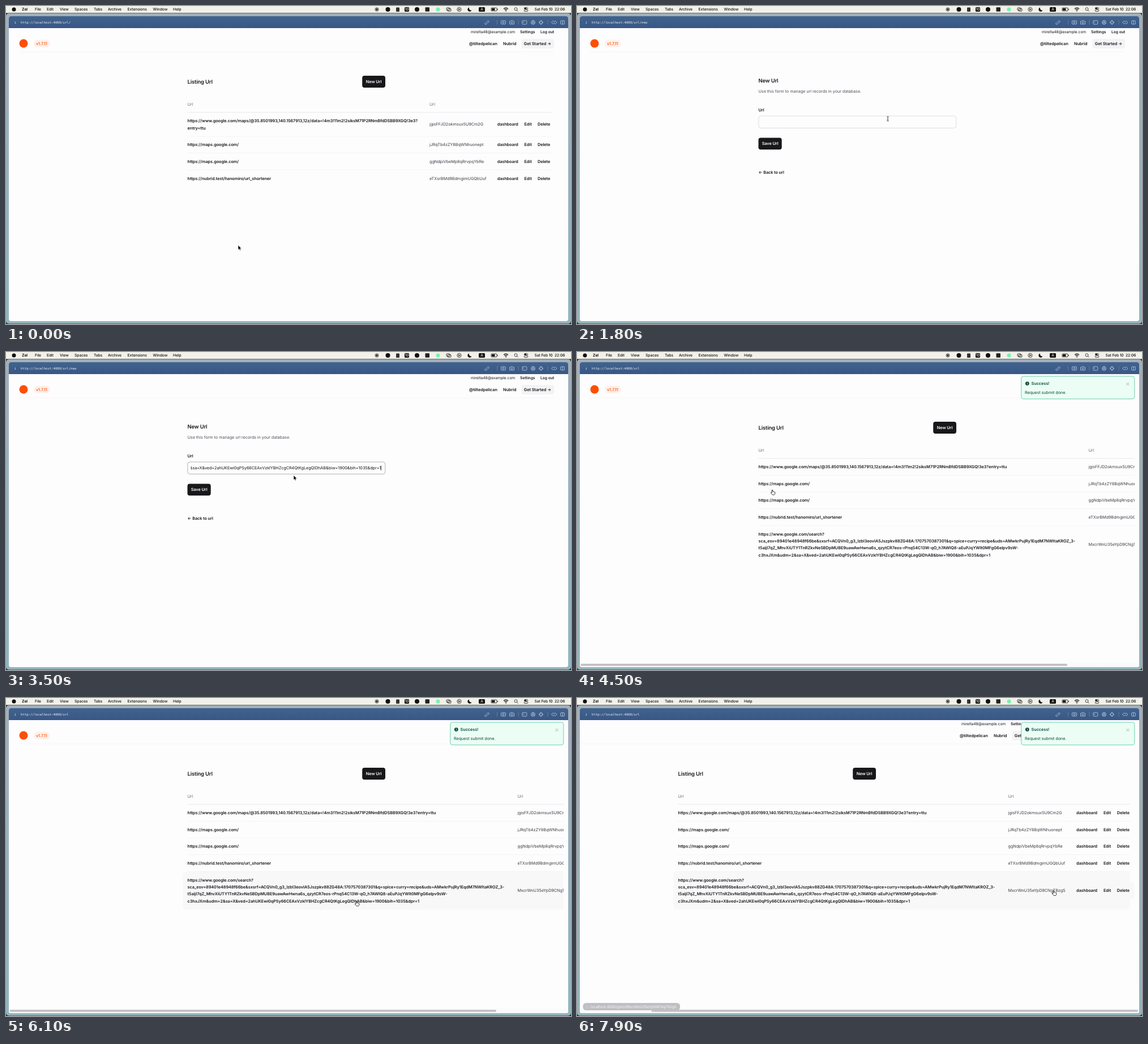
Animation, 998 px wide and 561 px high, one loop 8 s. Source, as an HTML page:

```html
<!DOCTYPE html>
<html lang="en">
<head>
<meta charset="utf-8">
<title>Url listing</title>
<style>
  html, body { margin: 0; width: 100%; height: 100%; overflow: hidden; background: #9db3bd; }
  svg { display: block; width: 100vw; height: 100vh; }
  text { font: 400 7.28px Inter, sans-serif; letter-spacing: -.008em; fill: #18181b; white-space: pre; text-rendering: geometricPrecision; }
  .b { font-weight: 600; }
  .title { font-size: 9.36px; font-weight: 600; letter-spacing: -.014em; }
  .small { font-size: 6.76px; }
  .menu { font-size: 6.76px; font-weight: 500; letter-spacing: -.015em; fill: #111; }
  .app { font-weight: 700; }
  .mono { font: 400 5.63px "DejaVu Sans Mono", monospace; letter-spacing: 0; fill: #eef2f8; }
  .mid { text-anchor: middle; }
  .end { text-anchor: end; }
  .white { fill: #fff; }
  .grey { fill: #71717a; }
  .sub { fill: #52525b; }
  .slug { fill: #3f3f46; }
  .brand { fill: #fd4f00; font-weight: 500; }
  .green { fill: #064e3b; }
  .status { font-size: 6.4px; fill: #f6f6f7; }
  .line { fill: none; stroke: #111; stroke-width: .8; }
  .tool { fill: none; stroke: #c3d0e2; stroke-width: .8; }
</style>
</head>
<body>
<svg viewBox="0 0 998 561" preserveAspectRatio="none">
  <defs>
    <linearGradient id="desk" x2="0" y2="1">
      <stop offset="0" stop-color="#a3afb9"/><stop offset="1" stop-color="#92b4bd"/>
    </linearGradient>
    <linearGradient id="bar" x2="0" y2="1">
      <stop offset="0" stop-color="#42638f"/><stop offset="1" stop-color="#385784"/>
    </linearGradient>
    <clipPath id="view"><rect x="5" y="39" width="980" height="509"/></clipPath>
    <clipPath id="field"><rect x="326.5" y="195" width="337" height="20"/></clipPath>
  </defs>
  <g id="chrome"></g>
  <g clip-path="url(#view)"><g id="content">
    <g id="header"></g><g id="before"></g><g id="form"></g><g id="after"></g>
  </g></g>
  <g id="extras"></g>
  <g id="status"></g>
  <g id="pointer">
    <path id="arrow" d="M0 0V8.2L1.9 6.5 3.1 9.3 4.6 8.6 3.4 5.9H6Z" fill="#000" stroke="#fff" stroke-width=".6"/>
    <path id="hand" d="M-.8 .6Q0-.6 .8 .6V3.4Q1.7 2.7 2.2 3.6 3.2 3 3.6 4 4.8 3.6 4.8 5V6.4Q4.7 8.4 3.4 9H.4Q-1 7.8-2.8 5.3-2.5 4-.8 5.3Z" fill="#fff" stroke="#000" stroke-width=".8"/>
    <path id="beam" d="M-1.8-4Q0-4 0-3 0-4 1.8-4M0-3V3M-1.8 4Q0 4 0 3 0 4 1.8 4M-.8 1H.8" fill="none" stroke="#222" stroke-width=".8"/>
  </g>
</svg>
<script>
const LOOP = 8000, STEP = 100;
const OPEN_FORM = 1300, FOCUS = 2300, PASTE = 2900, SAVED = 4500, STATUS = 7800;
const MAX_SCROLL = 142;

const $ = id => document.getElementById(id);
const esc = s => s.replace(/&/g, '&amp;');
const text = (x, y, s, cls = '') => `<text x="${x}" y="${y}" class="${cls}">${esc(s)}</text>`;
const rect = (x, y, w, h, fill, r = 0, more = '') =>
  `<rect x="${x}" y="${y}" width="${w}" height="${h}" rx="${r}" fill="${fill}" ${more}/>`;
const dot = (x, y, r, fill) => `<circle cx="${x}" cy="${y}" r="${r}" fill="${fill}"/>`;
const path = (d, cls = 'line', more = '') => `<path d="${d}" class="${cls}" ${more}/>`;
const ring = (x, y, r, cls = 'line') => `<circle cx="${x}" cy="${y}" r="${r}" class="${cls}"/>`;
const box = (x, y, w, h, cls = 'line') =>
  `<rect x="${x}" y="${y}" width="${w}" height="${h}" rx="1" class="${cls}"/>`;
const button = (x, y, w, label) =>
  rect(x, y, w, 20.8, '#18181b', 4) + text(x + w / 2, y + 13, label, 'b mid white');

// Window frame, menu bar and toolbar
const menus = [['File', 51], ['Edit', 72], ['View', 95], ['Spaces', 121], ['Tabs', 155],
  ['Archive', 180], ['Extensions', 214.5], ['Window', 259.5], ['Help', 295]];
$('chrome').innerHTML =
  rect(0, 0, 998, 561, '#25313c') +
  rect(0, 13, 998, 547.5, 'url(#desk)', 5) +
  rect(0, 0, 998, 12.3, '#f1f1e9') +
  dot(14, 6, 3.5, '#111') + text(28, 8.4, 'Zel', 'menu app') +
  menus.map(([s, x]) => text(x, 8.4, s, 'menu')).join('') +
  ring(655, 6, 3) + dot(655, 6, 1.7, '#111') +
  dot(674.5, 6, 4, '#111') +
  rect(689, 2.5, 6, 7.5, '#333', 1) +
  rect(704, 2, 8, 8, '#111', 1.5) + text(708, 8.1, '10', 'small mid white') +
  dot(726, 6, 4, '#111') +
  rect(740.5, 2.2, 7.5, 7.5, '#222', 1) +
  dot(763, 6, 3.5, '#7bf0ae') +
  box(778, 3, 6, 4.5) + box(780, 4.7, 6, 4.5) +
  ring(800.5, 6, 3.6) + path('M799.5 4.3V7.7L802.3 6Z') +
  path('M818 2.4A3.8 3.8 0 1 0 822.5 7.8 4.4 4.4 0 0 1 818 2.4Z', '', 'fill="#111"') +
  rect(835, 2, 11, 8, '#111', 1.5) + text(840.5, 8.3, 'A', 'small mid white') +
  box(857, 3.2, 10, 5.6) + rect(858, 4.2, 5.5, 3.6, '#111') + rect(867.7, 5, 1, 2, '#111') +
  path('M879 5Q883 1.4 887 5M880.6 6.8Q883 4.4 885.4 6.8', 'line', 'style="stroke-width:1.2"') + dot(883, 8.6, 1, '#111') +
  ring(900.6, 5.4, 2.5) + path('M902.4 7.2 904.6 9.4') +
  rect(915, 2.5, 7, 3, '#111', 1.5) + box(915.3, 6.6, 6.4, 2.8) + dot(920.2, 4, 1, '#fff') +
  text(987.5, 8.4, 'Sat Feb 10  22:06', 'menu end') +
  rect(5, 18, 988, 538, '#fdfdfe', 4) +
  path('M5 39V22Q5 18 9 18H989Q993 18 993 22V39Z', '', 'fill="url(#bar)"') +
  text(14.5, 31, 'i', 'mono b') +
  '<text id="address" x="26" y="31" class="mono"></text>' +
  path('M848.6 30.6 850 29.2M847.6 28.8 846 30.4Q845.2 32 846.6 32.6 847.6 33 848.6 32L849.8 30.8M848.6 28.4 850.4 26.6Q851.8 25.4 852.8 26.6 853.6 27.6 852.4 28.8L850.8 30.2', 'tool') +
  path('M867.5 25V33M905 25V33M957 25V33', 'tool', 'opacity=".35"') +
  box(874.5, 26, 8, 6, 'tool') + ring(878.5, 29, 1.5, 'tool') +
  path('M889.5 27H891L892 25.7H895L896 27H897.5V32H889.5Z', 'tool') + ring(893.5, 29.3, 1.4, 'tool') +
  box(911.8, 25.8, 8, 6.4, 'tool') + path('M913.3 27.5 914.6 28.6 913.3 29.7', 'tool') +
  ring(931, 29, 3.5, 'tool') + ring(931, 29, 1.4, 'tool') + path('M931 25.5V27.6M928 30.7 929.6 29.8M934 30.7 932.4 29.8', 'tool') +
  ring(945, 29, 2.8, 'tool') + path('M945 24.8V27.5M945 30.5V33.2M940.8 29H943.5M946.5 29H949.2', 'tool') +
  path('M963.5 29 966.2 26.2 968.2 28 970.2 26.2 973 29 970.2 31.8 968.2 30 966.2 31.8Z', 'tool') +
  box(979.6, 26, 6.8, 6, 'tool') + path('M983 26V32', 'tool');

$('header').innerHTML =
  text(821, 48.4, 'mirelta48@example.com', 'small') +
  text(908, 48.4, 'Settings', 'small b') + text(944, 48.4, 'Log out', 'small b') +
  dot(31, 66, 7.5, '#fd4f00') +
  rect(49, 59.5, 29, 13.5, '#fff0ea', 6.7) + text(53, 69, 'v1.7.11', 'brand') +
  text(818, 69.1, '@tiltedpelican', 'b') + text(878, 69.1, 'Nubrid', 'b') +
  rect(910.5, 58, 57.5, 16.8, '#f3f3f5', 4) + text(914.8, 69.1, 'Get Started →', 'b') +
  rect(22, 80.7, 946, .6, '#efeff1');

// Listing pages
const MAP = 'https://www.google.com/maps/@35.8501993,140.1567913,12z/data=!4m3!11m2!2siksM71P2RNmBfdDSBB9XGQ!3e3?';
const TAIL = '&udm=2&sa=X&ved=2ahUKEwi0qPSy66CEAxVzklYBHZcgCR4QtKgLegQIDhAB&biw=1900&bih=1035&dpr=1';
const NEW_SLUG = 'MxcrWnU35eYpD9CNgTBzgS';
const shared = [
  [['https://maps.google.com/'], 'jJRqTb4zZY8BqWNhuonept'],
  [['https://maps.google.com/'], 'ggNdpiVbeMp8qRrvpqYbRe'],
  [['https://nubrid.test/hanomiro/url_shortener'], 'eTXsrBMd9BdmgimUGQbUuf'],
];
const FIRST_SLUG = 'jgisFFJD2okmsux5U9Cm2G';
const lists = {
  before: {
    slugX: 748, actionX: [867.7, 915.5, 939], right: 963,
    tops: [187.5, 230, 259.6, 289.2, 318.8],
    rows: [[[MAP, 'entry=ttu'], FIRST_SLUG], ...shared],
  },
  after: {
    slugX: 903.5, actionX: [1024, 1072, 1095.8], right: 1119,
    tops: [187.5, 217.3, 246.9, 276.5, 306.1, 373.2],
    rows: [[[MAP + 'entry=ttu'], FIRST_SLUG], ...shared, [[
      'https://www.google.com/search?',
      'sca_esv=89401e48948f66be&sxsrf=ACQVn0_g3_lzbI3eovIA5Jszpkv88ZG48A:1707570387301&q=spice+curry+recipe&uds=AMwkrPujRy1EqdM7NWItaKROZ_3-',
      't5aijI7qZ_MhvXiUTY1TnRZkvNeSBDpMUBE9uawAwHwna6s_qzytCR7eos-rPnq54C13W-qO_h7AWIQ8-aEuPJqYWlt0MFgG6eIpv9sW-',
      'c3hxJXm' + TAIL], NEW_SLUG]],
  },
};

function listing({ slugX, actionX, right, tops, rows }) {
  const body = rows.map(([lines, slug], i) => {
    const top = tops[i], h = tops[i + 1] - top, mid = top + h / 2, base = mid + 2.6;
    const hover = rect(312.5, top, right - 312.5, h, '#f8f8f9', 6) +
      rect(right - 40, mid - 14.8, 48.3, 29.6, '#f8f8f9', 6);
    return `<g class="hover" visibility="hidden">${hover}</g>` +
      rect(320.5, top - .3, right - 320.5, .6, i ? '#ededf0' : '#dedee2') +
      lines.map((s, n) => text(320.5, base + (n - (lines.length - 1) / 2) * 12.48, s, 'b')).join('') +
      text(slugX, base, slug, 'slug') +
      ['dashboard', 'Edit', 'Delete'].map((s, n) => text(actionX[n], base, s, 'b')).join('');
  });
  return text(320.5, 136.6, 'Listing Url', 'title') + button(629.2, 123.1, 40.8, 'New Url') +
    text(320.5, 175.6, 'Url', 'grey') + text(slugX, 175.6, 'Url', 'grey') + body.join('');
}
for (const id in lists) {
  $(id).innerHTML = listing(lists[id]);
  lists[id].hovers = $(id).querySelectorAll('.hover');
}

$('form').innerHTML =
  text(320.5, 134.6, 'New Url', 'title') +
  text(320.5, 152.6, 'Use this form to manage url records in your database.', 'sub') +
  text(320.5, 186, 'Url', 'b') +
  rect(320.8, 194, 349, 21.3, '#fdfdfe', 4, 'id="input" stroke-width=".7"') +
  `<g clip-path="url(#field)"><g id="typed">${text(662.3, 207.4, TAIL, 'end')}</g></g>` +
  rect(662.3, 200.5, .7, 8.5, '#111', 0, 'id="caret"') +
  button(320.5, 232.4, 41.2, 'Save Url') +
  text(320.5, 295.6, '← Back to url', 'b');

$('extras').innerHTML =
  rect(5, 548, 988, 8, '#fafafa', 3) +
  rect(6.5, 550, 859.5, 3.8, '#c1c1c3', 1.9, 'id="thumb"') +
  rect(784.8, 42.8, 200, 40, '#ecfdf5', 4, 'stroke="#46c79a" stroke-width=".8"') +
  dot(795.3, 55.6, 3.4, '#064e3b') + rect(794.9, 55, .9, 2.4, '#ecfdf5') + dot(795.3, 53.8, .55, '#ecfdf5') +
  text(802.6, 58.3, 'Success!', 'b green') +
  text(791, 73.8, 'Request submit done.', 'green') +
  path('M970.4 54 975.4 59M975.4 54 970.4 59', 'line', 'style="stroke:#8fa79f"');

$('status').innerHTML =
  rect(10.5, 538, 171.5, 13, '#bfbfc3', 5.5) +
  box(15.8, 544, 3.8, 3, 'tool') + path('M16.6 544V542.8Q17.7 541 18.8 542.8V544', 'tool') +
  text(24, 546.8, 'localhost:4000/goto/' + NEW_SLUG, 'status');

// Motion
const moves = [[0, 410, 422], [300, 410, 422], [1000, 646, 135], [1300, 646, 135], [1800, 549, 199],
  [2200, 502, 205], [2900, 502, 206], [3500, 508, 217.5], [4100, 345, 243], [4600, 345, 243],
  [5200, 347.5, 243], [5400, 348, 243], [6100, 619, 358], [6300, 619, 358], [7000, 867.5, 353.5],
  [7300, 867.5, 353.5], [7800, 842, 339.5], [8000, 842, 339.5]];
const scrolls = [[0, 0], [6400, 0], [7000, 107.5], [7300, MAX_SCROLL], [8000, MAX_SCROLL]];

function at(keys, t) {
  const i = keys.findIndex(k => k[0] > t), a = keys[i - 1], b = keys[i];
  const p = (t - a[0]) / (b[0] - a[0]), e = keys === scrolls ? p : p * p * (3 - 2 * p);
  return a.slice(1).map((v, n) => v + (b[n + 1] - v) * e);
}
const show = (el, on) => el.setAttribute('visibility', on ? 'visible' : 'hidden');
const showPart = (id, on) => $(id).style.display = on ? '' : 'none';
const inside = (x, y, l, t, r, b) => x > l && x < r && y > t && y < b;

function draw(t) {
  const page = t < OPEN_FORM ? 'before' : t < SAVED ? 'form' : 'after';
  const [x, y] = at(moves, t), [scroll] = at(scrolls, t), px = x + scroll;
  for (const id of ['before', 'form', 'after']) showPart(id, page === id);
  showPart('extras', page === 'after');
  showPart('status', t >= STATUS);
  $('address').textContent = 'http://localhost:4000/url' + { before: '/', form: '/new', after: '' }[page];
  $('content').setAttribute('transform', `translate(${-scroll} 0)`);
  $('thumb').setAttribute('x', 6.5 + scroll * .88);

  $('input').setAttribute('stroke', t >= FOCUS ? '#94949c' : '#d0d0d5');
  showPart('typed', t >= PASTE);
  showPart('caret', t >= FOCUS);
  $('caret').setAttribute('x', t >= PASTE ? 662.3 : 327);

  let kind = 'arrow';
  if (page === 'form') {
    if (inside(x, y, 320, 194, 670, 215.5)) kind = 'beam';
    else if (inside(x, y, 320, 232, 362, 253)) kind = 'hand';
  } else {
    const { tops, right, hovers } = lists[page];
    if (inside(px, y, 629, 123, 670, 144)) kind = 'hand';
    hovers.forEach((el, i) => {
      const over = inside(px, y, 312, tops[i], right, tops[i + 1]);
      if (over) kind = 'hand';
      show(el, over && (page === 'before' || t > 5400));
    });
  }
  for (const id of ['arrow', 'hand', 'beam']) showPart(id, id === kind);
  $('pointer').setAttribute('transform', `translate(${x} ${y})`);
}

const start = performance.now();
function tick() {
  const t = (performance.now() - start) % LOOP;
  draw(Math.floor(t / STEP) * STEP);
  requestAnimationFrame(tick);
}
tick();
</script>
</body>
</html>
```
